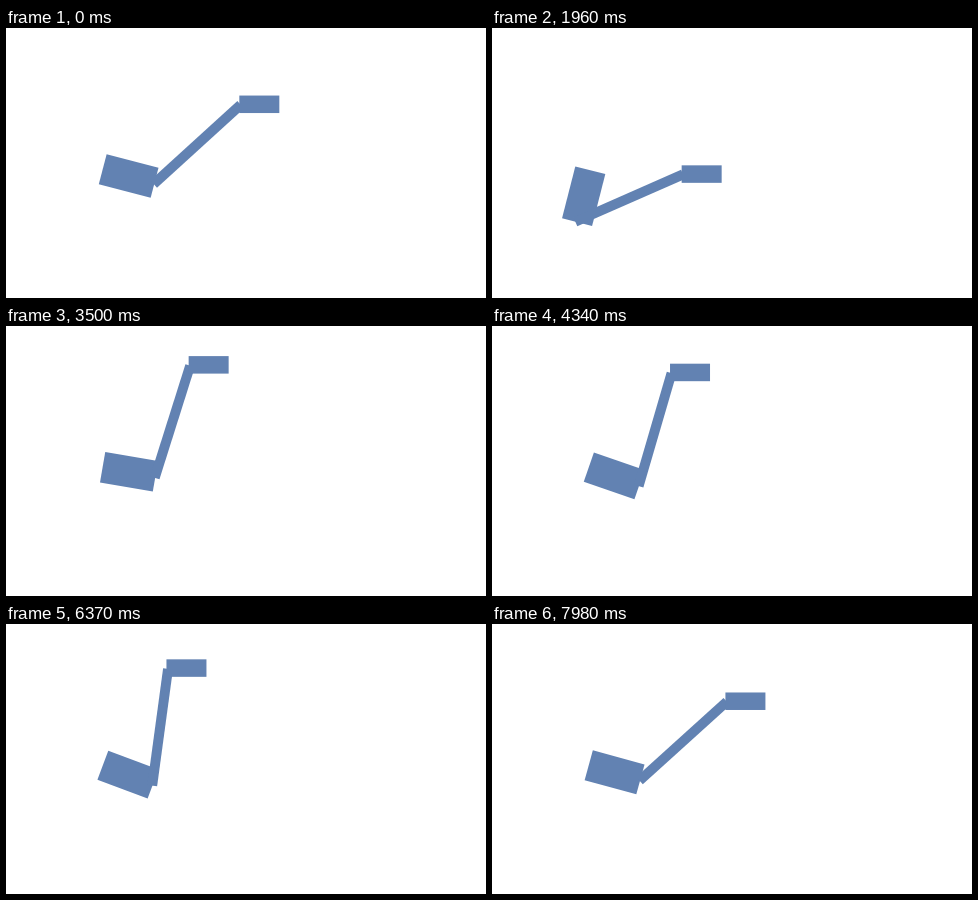
These frames come from a looping animation (480 by 270 pixels, 8 s). An HTML page with a canvas:

```html
<!DOCTYPE html>
<html lang="en">
<head>
<meta charset="utf-8">
<title>Two-link arm</title>
<style>
  html, body { margin: 0; width: 100%; height: 100%; overflow: hidden; background: #fff; }
  canvas { display: block; width: 100%; height: 100%; }
</style>
</head>
<body>
<canvas id="stage" width="480" height="270"></canvas>
<script>
const ctx = document.getElementById('stage').getContext('2d');
const COLOR = '#6282b2';
const LOOP = 8000, STEP = 70, CYCLE = 7.96;
const PIVOT = { x: 97, y: 142.5 };
const UPPER = 53, FORE = 117.7;

// The hand sways between a few turning points: [seconds, position]
const swayX = sway([
  [0.85, 235.4], [1.84, 188.3], [2.86, 223.7], [3.98, 156],
  [4.99, 231.8], [6.17, 153], [7.17, 227.6]
]);
const swayY = sway([
  [0, 76.3], [0.98, 145.2], [1.71, 156], [3.12, 36.8], [4.4, 46.5],
  [4.8, 45.2], [5.6, 53.5], [6.82, 39.9]
]);

// Periodic monotone cubic: rests at every turn, flows through the other keys
function sway(keys) {
  const n = keys.length;
  const key = i => {
    const turn = Math.floor(i / n), [t, v] = keys[i - turn * n];
    return [t + turn * CYCLE, v];
  };
  const slope = i => {
    const [t0, v0] = key(i - 1), [t1, v1] = key(i), [t2, v2] = key(i + 1);
    const h0 = t1 - t0, h1 = t2 - t1;
    const s0 = (v1 - v0) / h0, s1 = (v2 - v1) / h1;
    if (s0 * s1 <= 0) return 0;
    return 3 * (h0 + h1) / ((2 * h1 + h0) / s0 + (h1 + 2 * h0) / s1);
  };
  return seconds => {
    const t = seconds % CYCLE;
    let i = n - 1;
    while (key(i)[0] > t) i--;
    const [t0, v0] = key(i), [t1, v1] = key(i + 1);
    const span = t1 - t0, u = (t - t0) / span, w = 1 - u;
    return v0 + (v1 - v0) * u * u * (3 - 2 * u) +
      span * u * w * (w * slope(i) - u * slope(i + 1));
  };
}

function bar(origin, angle, x, y, w, h) {
  ctx.save();
  ctx.translate(origin.x, origin.y);
  ctx.rotate(angle);
  ctx.fillRect(x, y, w, h);
  ctx.restore();
}

function draw(ms) {
  const hand = { x: swayX(ms / 1000), y: swayY(ms / 1000) };
  const wrist = { x: hand.x + 2, y: hand.y + 0.4 };

  // Inverse kinematics with the elbow on the lower side
  const dx = wrist.x - PIVOT.x, dy = wrist.y - PIVOT.y, reach = Math.hypot(dx, dy);
  const cos = (UPPER ** 2 + reach ** 2 - FORE ** 2) / (2 * UPPER * reach);
  const shoulder = Math.atan2(dy, dx) + Math.acos(Math.max(-1, Math.min(1, cos)));
  const elbow = {
    x: PIVOT.x + UPPER * Math.cos(shoulder),
    y: PIVOT.y + UPPER * Math.sin(shoulder)
  };
  const foreAngle = Math.atan2(wrist.y - elbow.y, wrist.x - elbow.x);

  ctx.fillStyle = '#fff';
  ctx.fillRect(0, 0, 480, 270);
  ctx.fillStyle = COLOR;
  bar(PIVOT, shoulder, -0.6, -16.7, 53.6, 31);
  bar(elbow, foreAngle, -0.5, -5.3, FORE, 9.9);
  bar(hand, 0, 0, -8.75, 40, 17.5);
}

const start = performance.now();
function frame() {
  const ms = (performance.now() - start) % LOOP;
  draw(Math.floor(ms / STEP) * STEP);
  requestAnimationFrame(frame);
}
frame();
</script>
</body>
</html>
```
